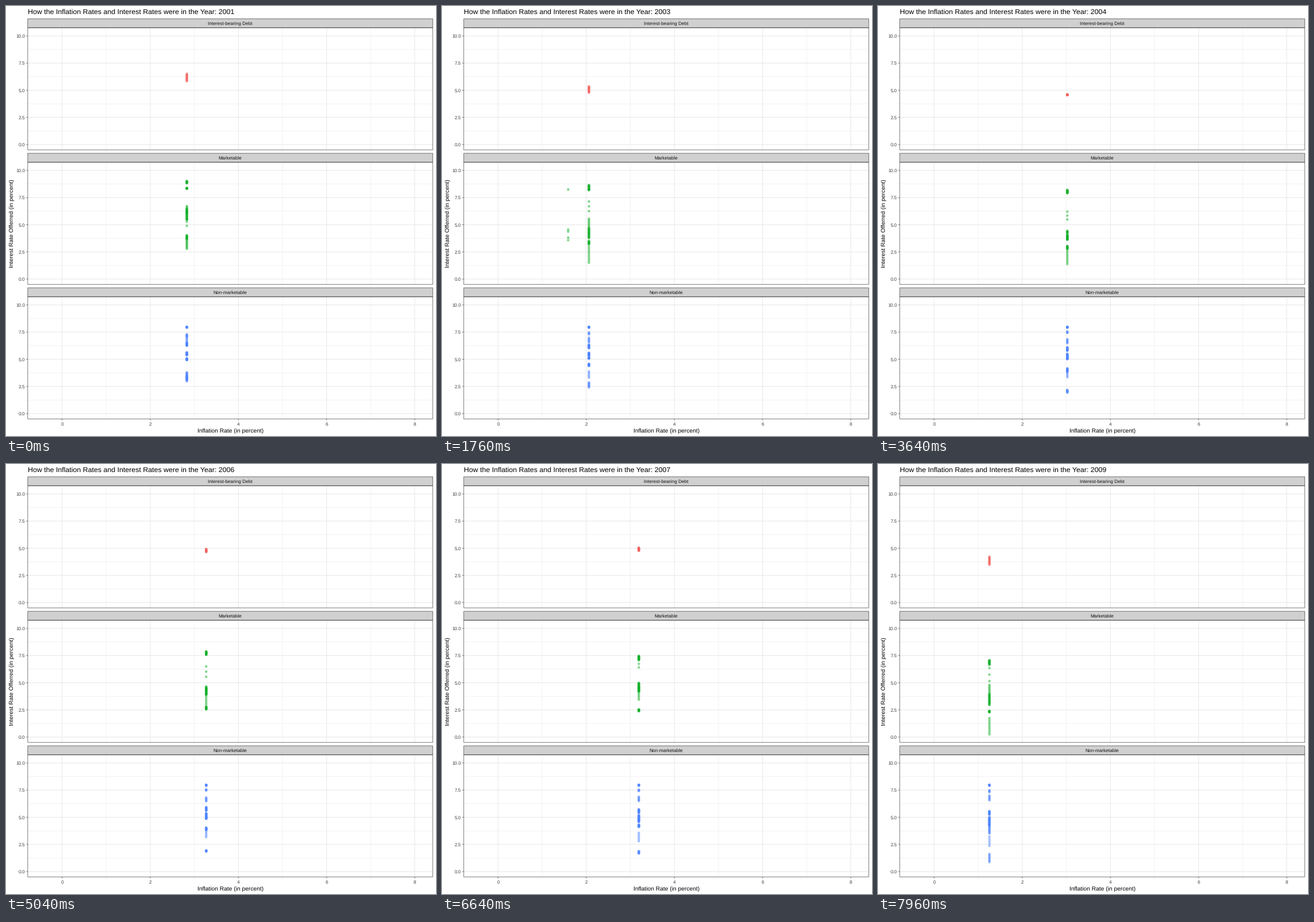
Animation of 748x748 px, one loop 8 s. Source, as a matplotlib script:

```python
import numpy as np
import matplotlib.pyplot as plt
from matplotlib.animation import FuncAnimation
from matplotlib.collections import LineCollection
from matplotlib.patches import Rectangle

SIZE, DPI = 748, 64
PT = 72 / DPI                      # points per pixel
FRAMES, INTERVAL = 200, 40
YEAR_FRAMES = 575 / 22             # frames from one year to the next

INFLATION = [2.83, 1.59, 2.27, 2.68, 3.39, 3.24, 2.85, 3.84, -0.36]
YEAR_START = [round(i * YEAR_FRAMES) for i in range(len(INFLATION))]

LEFT, RIGHT = 37.8, 742.4
PANEL_STEP = 234
X_TICKS = np.arange(0, 9, 2)
Y_TICKS = np.arange(0, 10.1, 2.5)
BORDER = (0.2, 0.2, 0.2, 0.65)

plt.rcParams["font.family"] = "Liberation Sans"
plt.rcParams["text.hinting"] = "none"


def x_px(rate):
    return 97.5 + 76.7 * np.asarray(rate)


def y_px(rate, panel):
    return 241 + PANEL_STEP * panel - 18.9 * np.asarray(rate)


class Series:
    """A group of dots whose mean rate runs smoothly through evenly timed key rates."""

    def __init__(self, count, spread, *keys):
        times = np.linspace(0, 1, len(keys))
        self.mean = np.poly1d(np.polyfit(times, keys, len(keys) - 1))
        self.slope = self.mean.deriv()
        self.spread = spread
        self.steps = np.linspace(-0.5, 0.5, count)

    def rates(self, frame):
        # The months of a year lie further apart while the rate moves fast.
        t = frame / (FRAMES - 1)
        yearly = abs(self.slope(t)) * YEAR_FRAMES / FRAMES
        return self.mean(t) + self.steps * (self.spread + min(yearly, 0.7))


PANELS = [
    ("Interest-bearing Debt", "#f35e5a", [
        Series(12, 0.05, 6.17, 4.95, 4.6, 4.95, 3.85)]),
    ("Marketable", "#17b12b", [
        Series(8, 0.0, 8.92, 8.0, 6.9),
        Series(8, 0.05, 8.35, 7.95, 6.85),
        Series(3, 0.5, 5.5, 6.6, 5.8, 6.5, 5.75),
        Series(7, 0.1, 6.4, 5.0, 4.3, 4.75, 4.4),
        Series(22, 0.3, 5.95, 4.1, 3.9, 4.45, 3.45),
        Series(10, 0.05, 3.85, 2.85, 2.35),
        Series(9, 0.8, 3.2, 2.1, 2.3, 4.1, 1.0)]),
    ("Non-marketable", "#5086ff", [
        Series(8, 0.08, 7.95),
        Series(4, 0.1, 7.2, 7.5, 7.4),
        Series(6, 0.35, 6.95, 6.65, 6.78),
        Series(14, 0.2, 6.4, 5.9, 5.4),
        Series(16, 0.25, 5.5, 5.3, 4.8),
        Series(12, 0.05, 5.0, 5.05, 4.4),
        Series(12, 0.1, 3.4, 4.45, 3.95, 4.1, 3.9),
        Series(5, 0.5, 3.35, 3.6, 2.8),
        Series(8, 0.05, 3.3, 2.55, 2.0, 1.85, 1.25)]),
]

# Dots that stay at their year's place until the next year arrives
LEFT_BEHIND = {0: [8.92, 5.28, 3.82], 1: [8.25, 4.55, 4.37, 3.82, 3.58], 2: [8.0, 4.0, 3.5]}

fig = plt.figure(figsize=(SIZE / DPI, SIZE / DPI), dpi=DPI, facecolor="white")
ax = fig.add_axes([0, 0, 1, 1])
ax.set_xlim(0, SIZE)
ax.set_ylim(SIZE, 0)
ax.axis("off")


def label(x, y, text, size, color="black", ha="center", rotation=0):
    return ax.text(x, y, text, fontsize=size * PT, color=color, ha=ha, va="baseline",
                   rotation=rotation, rotation_mode="anchor", zorder=6)


def lines(segments, color, width, z):
    ax.add_collection(LineCollection(segments, colors=color, linewidths=width * PT,
                                     zorder=z, snap=False, capstyle="butt"),
                      autolim=False)


def box(top, bottom, fill, z):
    ax.add_patch(Rectangle((LEFT, top), RIGHT - LEFT, bottom - top, facecolor=fill,
                           edgecolor=BORDER, linewidth=PT, zorder=z, snap=False))


def grid(xs, ys, panel, top, bottom, width, z):
    segs = [[(LEFT, y), (RIGHT, y)] for y in y_px(ys, panel)]
    segs += [[(x, top), (x, bottom)] for x in x_px(xs)]
    lines(segs, "#e7e7e7", width, z)


def dot_group(color):
    group = ax.scatter([], [], s=(4.5 * PT) ** 2, c=color, alpha=0.5,
                       edgecolors="none", zorder=3, snap=False)
    group.set_linewidth([0, 0])    # two widths keep the dots off the pixel grid
    return group


dots = []
for p, (name, color, _) in enumerate(PANELS):
    shift = p * PANEL_STEP
    top, bottom = 37.8 + shift, 250.3 + shift
    grid(X_TICKS[:-1] + 1, Y_TICKS[:-1] + 1.25, p, top, bottom, 0.5, 1)
    grid(X_TICKS, Y_TICKS, p, top, bottom, 1, 2)
    box(top, bottom, "none", 5)
    box(22.2 + shift, top, "#d0d0d0", 4)
    label((LEFT + RIGHT) / 2, 33 + shift, name, 8.23, "#141414")
    lines([[(LEFT - 2.6, y), (LEFT, y)] for y in y_px(Y_TICKS, p)], BORDER, 1, 4)
    for v in Y_TICKS:
        label(33.3, y_px(v, p) + 3, f"{v:.1f}", 8.23, "#414141", ha="right")
    dots.append(dot_group(color))

lines([[(x, bottom), (x, bottom + 2.6)] for x in x_px(X_TICKS)], BORDER, 1, 4)
for v in X_TICKS:
    label(x_px(v), 729.6, str(v), 8.23, "#414141")
label((LEFT + RIGHT) / 2, 741.6, "Inflation Rate (in percent)", 10.28)
label(12.8, 378, "Interest Rate Offerred (in percent)", 10.28, rotation=90)
title = label(LEFT, 14, "", 12.34, ha="left")


def column(x, rates, panel):
    return np.column_stack([np.full(len(rates), x_px(x)), y_px(rates, panel)])


def update(frame):
    year = 2001 + int(np.floor(frame / YEAR_FRAMES + 0.5))
    title.set_text("How the Inflation Rates and Interest Rates "
                   f"were in the Year: {year}")
    x = np.interp(frame, YEAR_START, INFLATION)
    current = np.searchsorted(YEAR_START, frame, side="right") - 1
    for p, (group, (_, _, series)) in enumerate(zip(dots, PANELS)):
        points = column(x, np.concatenate([s.rates(frame) for s in series]), p)
        if p == 1:
            old = column(INFLATION[current], LEFT_BEHIND.get(current, []), p)
            points = np.vstack([points, old])
        group.set_offsets(points)
    return [title, *dots]


anim = FuncAnimation(fig, update, frames=FRAMES, interval=INTERVAL,
                     init_func=lambda: update(0), repeat=True, repeat_delay=0)
plt.show()
```
